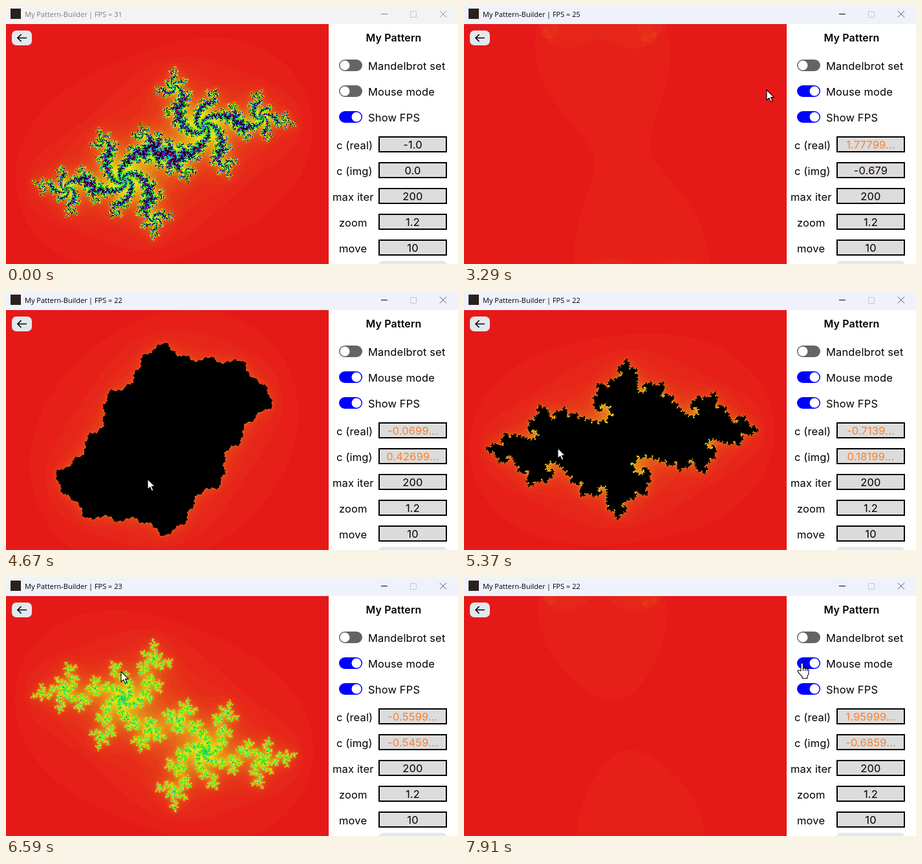
Write an HTML page with a canvas that moves like this. It is 699 by 400 pixels and loops after 8000 ms.

```html
<!DOCTYPE html>
<html lang="en">
<head>
<meta charset="utf-8">
<title>Julia set viewer</title>
<style>
  html, body { margin: 0; width: 100%; height: 100%; overflow: hidden; background: #fff; }
  canvas, svg { position: absolute; left: 0; top: 0; display: block; }
  canvas { top: 28px; }
  .bar { font: 11px "Open Sans", "Noto Sans", sans-serif; }
  .ui { font: 16.5px Inter, sans-serif; letter-spacing: .15px; }
  .mid { text-anchor: middle; }
  .head { font-size: 16px; font-weight: 600; }
  .cursor { fill: #fff; stroke: #000; stroke-width: 1.1; stroke-linejoin: round; }
</style>
</head>
<body>
<canvas id="view" width="499" height="372"></canvas>
<svg id="stage" width="699" height="400" viewBox="0 0 699 400"></svg>
<script>
const LOOP = 8000, MAX_ITER = 200, STEP = 0.007;
const CENTER = { x: 244, y: 200 };
const START_C = [-0.54, 0.54];

// Pointer path: time, x, y
const PATH = [
  [70, 668, 340], [500, 612, 250], [810, 562, 200], [1160, 537, 171],
  [2340, 537, 171], [2690, 533, 135], [2820, 531, 131], [3220, 531, 131],
  [3500, 420, 130], [3700, 345, 152], [3910, 307, 220], [4000, 308, 240],
  [4300, 315, 278], [4500, 285, 288], [4670, 240, 289], [4760, 219, 290],
  [5000, 176, 286], [5300, 150, 262], [5650, 138, 215], [5980, 131, 187],
  [6070, 127, 185], [6500, 160, 155], [7070, 215, 125], [7174, 216, 124],
  [7450, 290, 115], [7700, 420, 125], [7912, 530, 130], [8000, 523, 132]
];
// Frame rate readout: valid until, value
const RATES = [[2750, 31], [3600, 25], [4400, 23], [5800, 22], [7600, 23], [LOOP, 22]];
const LAG = 90, MOUSE_ON = 2690;

const stage = document.getElementById('stage');
const ctx = document.getElementById('view').getContext('2d');

function add(tag, attrs, text) {
  const el = document.createElementNS('http://www.w3.org/2000/svg', tag);
  for (const k in attrs) el.setAttribute(k, attrs[k]);
  if (text) el.textContent = text;
  return stage.appendChild(el);
}
const rect = (x, y, width, height, fill, more) => add('rect', { x, y, width, height, fill, ...more });
const label = (x, y, text, cls = 'ui') => add('text', { x, y, class: cls }, text);
const line = (d, stroke, width = 1) => add('path', { d, stroke, 'stroke-width': width, fill: 'none' });

// Title bar
const bar = rect(0, 0, 699, 28, '#f3f3f3');
rect(7, 4, 16, 16, '#2b211b');
const barName = label(29, 17, 'My Pattern-Builder', 'bar');
const barRate = label(128, 17, '', 'bar');
const minimise = line('M580 12.5H590', '#888');
line('M625.5 8.5h9v9h-9z', '#c4c6ca');
const closer = line('M671 7.5L681 17.5M681 7.5L671 17.5', '#888');

// Side panel
rect(499, 28, 200, 372, '#fff');
label(599.5, 55, 'My Pattern', 'ui mid head');

function toggle(y, text) {
  const track = rect(515, y - 9, 36, 18, '#646464', { rx: 9 });
  const knob = add('circle', { cx: 524, cy: y, r: 7.5, fill: '#fff' });
  label(560, y + 7, text);
  return on => {
    track.setAttribute('fill', on ? '#00f' : '#646464');
    knob.setAttribute('cx', on ? 542 : 524);
  };
}
toggle(92, 'Mandelbrot set');
const setMouse = toggle(132, 'Mouse mode');
const setShow = toggle(172, 'Show FPS');

function field(x, y, name, value) {
  label(x, y + 20, name);
  rect(577, y + 1, 104, 23, '#dcdcdc', { stroke: '#000', 'stroke-width': 2 });
  return label(629, y + 19, value, 'ui mid');
}
const realField = field(511, 202, 'c (real)', '-1.0');
const imagField = field(511, 242, 'c (img)', '0.0');
field(505, 282, 'max iter', '200');
field(515, 322, 'zoom', '1.2');
field(515, 362, 'move', '10');
rect(576, 395, 106, 30, '#e3e8ec', { rx: 7 });

// Back button
rect(9, 38, 31, 23, '#e3e8ec', { rx: 7 });
line('M32 49.5H18M23.5 44L18 49.5L23.5 55', '#000', 1.7);

const arrow = add('path', { class: 'cursor', d: 'M0 0V16L3.8 12.6L6.4 18.6L9 17.5L6.4 11.6H11.4z' });
const hand = add('path', {
  class: 'cursor',
  d: 'M-2 12V1.5a1.7 1.7 0 0 1 3.4 0V8q1.6-1.4 3.2 .3q1.6-1 3 .6q2.2-.5 2.4 1.8V15q0 3-2 5v3.5H0V21Q-5 16-7 12.5q0-2.4 2-1.6z' +
     'M1.4 8v4M4.6 8.6v3.6M7.6 9.2v3'
});

// Hue grows with the escape count; points that never escape are black
const palette = Uint32Array.from({ length: MAX_ITER + 1 }, (_, n) => {
  const part = k => {
    const p = (k + n * 6 / MAX_ITER) % 6;
    const level = 0.9 - 0.8 * Math.max(0, Math.min(p, 4 - p, 1));
    return Math.round(level * 255);
  };
  if (n === MAX_ITER) return 0xff000000;
  return (255 << 24 | part(1) << 16 | part(3) << 8 | part(5)) >>> 0;
});

const image = ctx.createImageData(499, 372);
const pixels = new Uint32Array(image.data.buffer);
let drawn = '';

function escapeCount(x, y, cr, ci) {
  let xx = x * x, yy = y * y;
  for (let n = 0; n < MAX_ITER; n++) {
    y = 2 * x * y + ci;
    x = xx - yy + cr;
    xx = x * x;
    yy = y * y;
    if (xx + yy > 4) return n;
  }
  return MAX_ITER;
}

function drawJulia(cr, ci) {
  const key = cr + ',' + ci;
  if (key === drawn) return;
  drawn = key;
  const { width, height } = image;
  for (let py = 0; py < height; py++) {
    const mirrorY = 2 * CENTER.y - py;
    for (let px = 0; px < width; px++) {
      const mirrorX = 2 * CENTER.x - px;
      // The set is symmetric about its centre, so reuse rows already done
      const done = mirrorY < py && mirrorX >= 0 && mirrorX < width;
      pixels[py * width + px] = done
        ? pixels[mirrorY * width + mirrorX]
        : palette[escapeCount((px - CENTER.x) * STEP, (py - CENTER.y) * STEP, cr, ci)];
    }
  }
  ctx.putImageData(image, 0, 0);
}

function pointer(t) {
  let i = 1;
  while (i < PATH.length - 1 && PATH[i][0] < t) i++;
  const [t0, x0, y0] = PATH[i - 1], [t1, x1, y1] = PATH[i];
  const k = Math.max(0, Math.min(1, (t - t0) / (t1 - t0)));
  return [Math.round(x0 + (x1 - x0) * k), Math.round(y0 + (y1 - y0) * k)];
}

// Values with float error are cut short and shown in orange
function showValue(el, n) {
  const short = n === 0 || (n < -40 && n % 2 !== 0);
  const cut = n * STEP - Math.sign(n) * 1e-9;
  el.textContent = n === 0 ? '0.0' : short ? (n * STEP).toFixed(3) : cut.toFixed(9).slice(0, 7) + '...';
  el.setAttribute('fill', short ? '#1c0a04' : '#ff7f27');
}

function plainValue(el, text) {
  el.textContent = text;
  el.setAttribute('fill', '#000');
}

function render(t) {
  const tick = t < 3204 ? Math.floor(t / 70) * 70 : 3220 + 69 * Math.floor((t - 3204) / 69);
  const focus = t < 810 ? 0 : t < 880 ? 1 : 2;
  const ink = ['#7d7d7d', '#454545', '#000'][focus];
  bar.setAttribute('fill', focus ? '#eff2fa' : '#f3f3f3');
  barName.setAttribute('fill', ink);
  barRate.setAttribute('fill', ink);
  minimise.setAttribute('stroke', ink);
  closer.setAttribute('stroke', focus ? '#555' : '#888');

  const rate = RATES.find(r => t < r[0])[1];
  barRate.textContent = t >= 1490 && t < 2080 ? '' : '| FPS = ' + rate;
  setShow(t < 1490 || t >= 2150);

  const mouse = t >= MOUSE_ON;
  setMouse(mouse);
  if (mouse) {
    const [mx, my] = pointer(tick);
    showValue(realField, mx - 250);
    showValue(imagField, my - 228);
    drawJulia((mx - 250) * STEP, (my - 228) * STEP);
  } else {
    plainValue(realField, '-1.0');
    plainValue(imagField, '0.0');
    drawJulia(...START_C);
  }

  const [x, y] = pointer(tick + LAG);
  const over = x > 514 && x < 552 && (Math.abs(y - 132) < 10 || Math.abs(y - 172) < 10);
  const place = (el, visible) => {
    el.setAttribute('transform', `translate(${x} ${y})`);
    el.setAttribute('visibility', visible ? 'visible' : 'hidden');
  };
  place(arrow, t >= 70 && !over);
  place(hand, t >= 70 && over);
}

const begin = performance.now();
function frame() {
  render((performance.now() - begin) % LOOP);
  requestAnimationFrame(frame);
}
frame();
</script>
</body>
</html>
```
